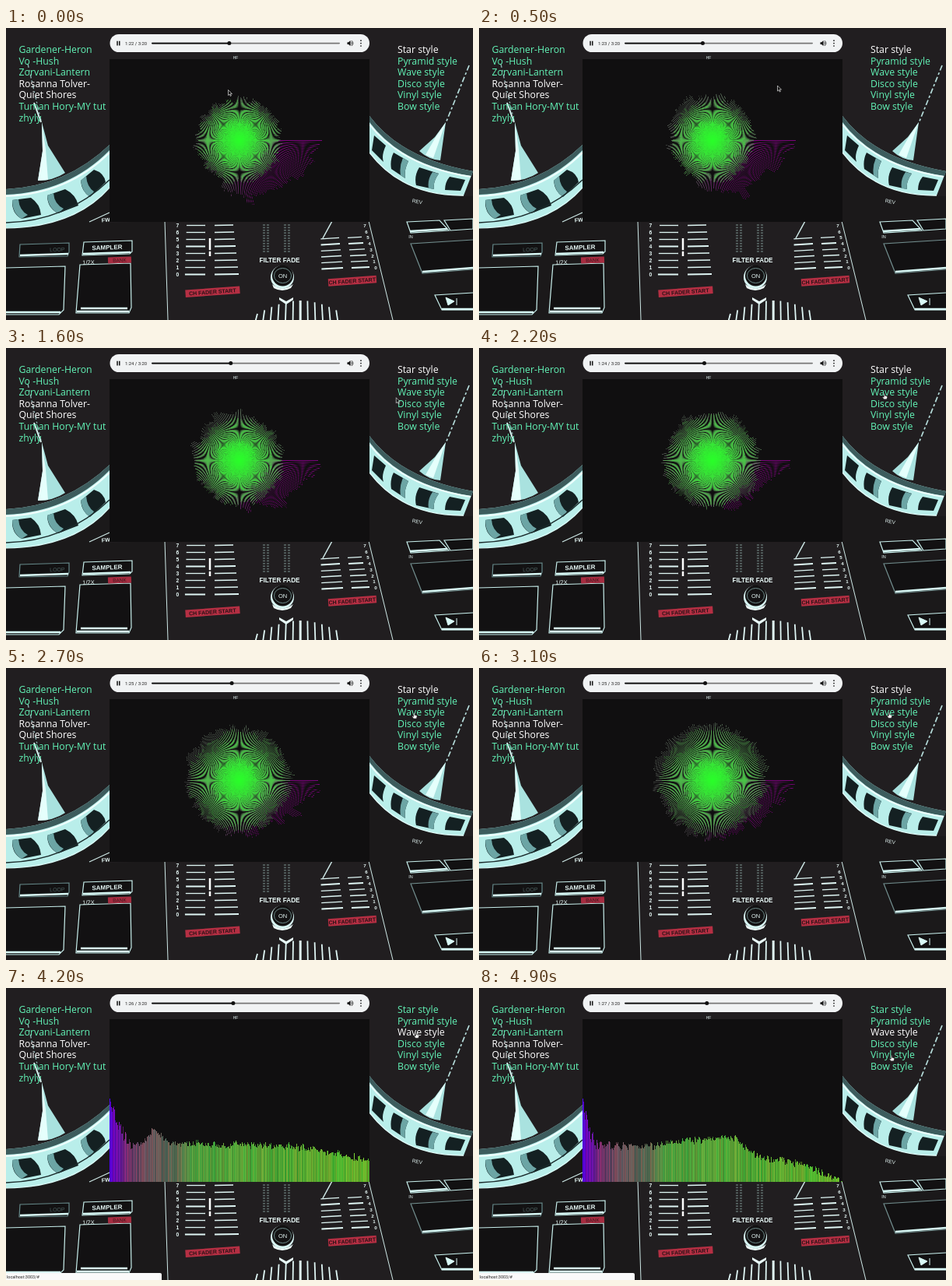
An HTML page with a canvas for the animation above (5000 ms loop, 600x375 px).

```html
<!DOCTYPE html>
<html lang="en">
<head>
<meta charset="utf-8">
<title>Music visualizer</title>
<style>
  html, body { margin: 0; width: 100%; height: 100%; overflow: hidden; background: #211e20; }
  svg, canvas { position: absolute; left: 0; top: 0; }
  #plot { left: 133px; top: 40px; }
  .menu { font: 12.3px "Open Sans", "Noto Sans", sans-serif; fill: #62f3b6; }
  .menu .on { fill: #fff; }
  .print { font-family: "Liberation Sans", Arial, sans-serif; fill: #e6f7f5; }
  .ui { font-family: Roboto, sans-serif; fill: #222; }
</style>
</head>
<body>
<svg width="600" height="375" viewBox="0 0 600 375">
  <rect width="600" height="375" fill="#211e20"/>
  <path d="M0 257Q80 258 133 203V250L204 248L208 375H0ZM467 161Q510 218 600 216V375H497L466 248Z" fill="#1b191a"/>

  <!-- left jog wheel -->
  <path d="M0 207Q78 203 133 150V205Q88 256 0 257Z" fill="#b9eeea"/>
  <path d="M0 207Q78 203 133 150V157Q80 211 0 214Z" fill="#3d5c5d"/>
  <path d="M0 216Q80 213 133 160" fill="none" stroke="#effffd" stroke-width="2"/>
  <path d="M8 221L32 218Q44 226 45 240L20 245Q7 238 8 221ZM53 215L76 207Q90 214 93 228L67 238Q53 231 53 215ZM96 196L113 182Q126 186 128 198L108 217Q97 210 96 196Z" fill="#142022"/>
  <path d="M8 221Q8 238 20 245L28 240Q17 234 16 220ZM53 215Q54 231 67 238L74 232Q62 226 61 212ZM96 196Q98 211 108 217L113 210Q104 204 103 190Z" fill="#6ca5a5"/>
  <path d="M0 250Q78 248 133 195" fill="none" stroke="#1a2a2b" stroke-width="1.5"/>
  <path d="M0 257Q88 256 133 205" fill="none" stroke="#d9fbf8" stroke-width="1.2"/>
  <path d="M46 121L54 151L76 186Q61 196 41 196L47 158Z" fill="#a9e2df"/>
  <path d="M46 121L51 156L54 195L41 196L47 158Z" fill="#e5fffc"/>
  <path d="M28 46L45 119" stroke="#8fb9b7" stroke-width="1.3" stroke-dasharray="5 3 2 4"/>
  <path d="M36 96L45 121" stroke="#d6f4f1" stroke-width="2"/>

  <!-- right jog wheel -->
  <path d="M467 113Q508 168 600 184L588 215Q510 216 467 160Z" fill="#b9eeea"/>
  <path d="M467 113Q508 168 600 184L598 190Q508 176 467 121Z" fill="#3d5c5d"/>
  <path d="M467 124Q510 178 597 191" fill="none" stroke="#effffd" stroke-width="2"/>
  <path d="M473 138L488 151Q482 164 485 172L470 157ZM498 160L517 171Q511 183 513 193L495 181Q493 170 498 160ZM531 179L556 187Q548 198 550 207L527 202Q524 190 531 179ZM570 191L590 195L584 209L564 208Q564 198 570 191Z" fill="#142022"/>
  <path d="M517 171Q511 183 513 193L507 189Q505 178 510 167ZM556 187Q548 198 550 207L543 206Q541 195 548 185Z" fill="#6ca5a5"/>
  <path d="M467 160Q510 216 588 215" fill="none" stroke="#e2fffc" stroke-width="1.3"/>
  <path d="M565 121L558 170Q543 169 531 158L551 140Z" fill="#a9e2df"/>
  <path d="M565 121L549 167L539 163L552 140Z" fill="#e5fffc"/>
  <path d="M595 48L565 122" stroke="#b5dcda" stroke-width="1.7" stroke-dasharray="7 3 3 3"/>

  <!-- panel edges -->
  <g fill="none" stroke="#cfe9e7">
    <path d="M204 248L208 375M466 248L497 375" stroke-width="1"/>
    <path d="M107 249L133 237" stroke-width="1.2"/>
    <path d="M419 248L407 270" stroke-width="1.5"/>
    <path d="M262 270V293" stroke="#fff" stroke-width="2.5"/>
    <path d="M260 286H264" stroke="#111" stroke-width="1.5"/>
  </g>

  <!-- pads -->
  <g fill="#121112" stroke="#c8efec" stroke-width="1.2">
    <path d="M18 278L81 276V288L79 293L17 294Z" stroke="#66898a"/>
    <path d="M100 275L162 273V287L159 290L98 292Z"/>
    <path d="M95 304L160 302L161 359L158 366H90Z"/>
    <path d="M0 308L76 306L74 362L68 368H0"/>
    <path d="M515 249L557 247L569 260L520 263Z"/>
    <path d="M563 247L600 245V258L571 260Z"/>
    <path d="M600 272L520 277L535 315L600 310" stroke="#718d8d"/>
    <path d="M600 340L551 343L560 362L600 362"/>
  </g>
  <g fill="none" stroke="#d9faf7" stroke-width="2.5">
    <path d="M18 292L80 290M99 290L160 288M91 364H158M96 360H156M0 365H70M519 261L567 258M535 313L600 308M560 361H600"/>
  </g>
  <path d="M565 346L576 351L568 356ZM579 347V356" fill="#d9faf7" stroke="#d9faf7"/>
  <rect x="131" y="294" width="30" height="8" fill="#a62c40" transform="rotate(-2 146 298)"/>

  <!-- filter button -->
  <circle cx="355" cy="320" r="15" fill="#d7f6f3"/>
  <circle cx="355.500" cy="318" r="13.500" fill="#131213"/>
  <ellipse cx="355.500" cy="318" rx="11" ry="9.500" fill="none" stroke="#6c8988"/>
  <path d="M342 329Q355 340 369 329L366 334Q355 340 344 334Z" fill="#f1fffe"/>
  <path d="M351 346L360 351L369 346V349L360 355L351 349Z" fill="#e9fbf9"/>

  <g id="marks" stroke="#dff6f4"></g>
  <g id="print" class="print"></g>
</svg>

<canvas id="plot" width="334" height="209"></canvas>

<svg width="600" height="375" viewBox="0 0 600 375">
  <rect x="133.500" y="8" width="333.500" height="23" rx="11.500" fill="#f1f3f4"/>
  <path d="M142.300 16.800h1.500v5.800h-1.500zM145 16.800h1.500v5.800H145z" fill="#111"/>
  <text id="clock" class="ui" x="153" y="21.700" font-size="5.900"></text>
  <rect x="187" y="18.800" width="242" height="1.600" rx=".8" fill="#777"/>
  <rect id="played" x="187" y="18.800" height="1.600" rx=".8" fill="#111"/>
  <circle id="knob" cy="19.600" r="2.500" fill="#111"/>
  <path d="M438.500 18.200h1.700l2.300-2.200v7.200l-2.300-2.200h-1.700z" fill="#111"/>
  <path d="M443.500 17.800q1.600 1.800 0 3.600M444 16.200q3.800 3.400 0 6.800" fill="none" stroke="#111" stroke-width=".8"/>
  <path d="M456 16.200v.01M456 19.600v.01M456 23v.01" stroke="#111" stroke-width="1.700" stroke-linecap="round"/>
  <g id="songs" class="menu"></g>
  <g id="styles" class="menu"></g>
  <g id="status">
    <path d="M0 366H198Q200 366 200 368V375H0Z" fill="#fafafa"/>
    <text class="ui" x="1" y="372.500" font-size="5.500">localhost:3003/#</text>
  </g>
  <path id="arrow" d="M0 0V7L1.700 5.500L2.800 8L3.900 7.500L2.800 5.100H5Z" fill="#111" stroke="#fff" stroke-width=".6"/>
  <path id="hand" d="M-.7 0Q0-.8.6 0V2.300L3 2.900Q3.700 3.200 3.500 4.300L2.800 6.800H-.8L-2.600 4.200Q-2.300 3.200-.7 4.300Z" fill="#fff" stroke="#222" stroke-width=".5"/>
</svg>

<script>
const LOOP = 5000, STEP = 100, SWITCH = 3400;
const BINS = 1024, TURNS = 4, SPOKES = BINS / TURNS;
const W = 334, H = 209, CX = 167, CY = 104.5;
const $ = id => document.getElementById(id);

function add(parent, tag, attrs, text) {
  const node = document.createElementNS("http://www.w3.org/2000/svg", tag);
  for (const key in attrs) node.setAttribute(key, attrs[key]);
  if (text !== undefined) node.textContent = text;
  parent.append(node);
  return node;
}

// Printed labels and scales on the mixer
function label(text, x, y, size, turn = 0, more = {}) {
  add($("print"), "text", {
    x, y, "font-size": size, "text-anchor": "middle",
    transform: `rotate(${turn} ${x} ${y})`, ...more
  }, text);
}
function line(x1, y1, x2, y2, width, stroke = "#dff6f4") {
  add($("marks"), "line", { x1, y1, x2, y2, "stroke-width": width, stroke });
}
function redTag(x, y, width) {
  add($("print"), "rect", {
    x: x - width / 2, y: y - 5, width, height: 9.5, fill: "#b52f43",
    transform: `rotate(-4 ${x} ${y})`
  });
  label("CH FADER START", x, y + 2.4, 7, -4, { fill: "#2a1216", "font-weight": 700 });
}

label("SAMPLER", 130, 284.5, 8, -2, { "font-weight": 700 });
label("LOOP", 66, 287, 7, -2, { fill: "#4c6262" });
label("1/2X", 106, 303.5, 7.5, -1);
label("BANK", 146, 300.5, 6.5, -2, { fill: "#3b141b" });
label("FW", 128.5, 249, 7, -5, { "font-weight": 700 });
label("FILTER FADE", 351.5, 300.5, 8.2, 0, { "font-weight": 700 });
label("ON", 355.5, 321, 7.5);
label("REV", 528, 225, 6.5, 10);
label("IN", 520, 270, 5.5);
label("HF", 295, 39.5, 5);
redTag(265.5, 339, 70);
redTag(445, 325, 62);

for (let i = 0; i < 8; i++) {
  const y = 253.5 + i * 9, bold = i === 3 || i === 7 ? 2 : 1.3;
  label(7 - i, 220.5, y + 2.5, 6.8, 0, { "font-weight": 700 });
  line(232 - i * .3, y, 256, y, bold);
  line(268, y, 292 + i, y - .5, bold);
  const ry = 254 + i * 7.7, shift = i * 2;
  label(7 - i, 461 + shift, ry + 2, 6.2, 0, { "font-weight": 700 });
  if (i > 1) {
    line(404 + i * .2, ry + 1.5, 426 + i, ry, bold);
    line(437 + i, ry, 453 + shift, ry - 1, bold);
  }
}
for (let y = 253; y < 288; y += 3.4)
  for (const x of [330, 335, 357, 362]) line(x, y, x + 3, y, 1.6, "#596766");
for (let i = 0; i < 12; i++) {
  const x = 323 + i * 9.2, big = i === 6;
  const y = 372 - 22 * Math.sin(Math.PI * (i + 1) / 14);
  line(x, y, x - (6 - i) * .4, 376, big ? 3 : 1.8);
}

// Side menus
function menu(group, rows, x) {
  return rows.map((row, i) => add(group, "text", { x, y: 32.2 + i * 14.55 }, row));
}
menu($("songs"), ["Gardener-Heron", "Vo -Hush", "Zorvani-Lantern", "Rosanna Tolver-",
  "Quiet Shores", "Tuman Hory-MY tut", "zhyly"], 16.5)
  .forEach((row, i) => row.classList.toggle("on", i === 3 || i === 4));
const styles = menu($("styles"), ["Star", "Pyramid", "Wave", "Disco", "Vinyl", "Bow"]
  .map(name => name + " style"), 503);

// Time, then bar heights at evenly spaced square roots of the frequency
const levels = [
  [0, 104, 105, 88, 80, 80, 50, 56, 54, 53, 52, 53, 51, 50, 48, 44, 38, 30, 20],
  [1000, 105, 106, 94, 88, 62, 50, 52, 68, 50, 52, 50, 49, 47, 45, 41, 36, 28, 18],
  [2200, 100, 99, 84, 66, 58, 58, 62, 63, 60, 60, 59, 58, 56, 53, 48, 42, 32, 20],
  [3100, 106, 106, 90, 78, 72, 70, 73, 75, 70, 68, 67, 66, 63, 58, 52, 45, 34, 20],
  [3800, 107, 104, 92, 72, 60, 50, 48, 52, 56, 55, 55, 53, 51, 48, 48, 44, 38, 30],
  [4200, 107, 104, 94, 76, 60, 46, 48, 68, 50, 48, 49, 48, 48, 47, 46, 43, 36, 27],
  [4900, 107, 98, 82, 58, 46, 47, 46, 46, 45, 46, 52, 54, 55, 57, 30, 27, 17, 0]
];
const pointer = [[0, 285.5, 79.5], [1000, 481.5, 68.5], [2200, 521, 59],
  [3100, 527, 57.5], [4200, 527, 57.5], [4900, 530, 87]];
const starStops = [[0, 150, 0, 150], [.05, 120, 0, 120], [.08, 100, 95, 100],
  [.2, 100, 125, 100], [.35, 85, 165, 80], [1, 60, 225, 60]];
const waveStops = [[0, 85, 0, 235], [.03, 115, 15, 180], [.07, 120, 50, 110],
  [.13, 115, 85, 100], [.26, 95, 115, 85], [.32, 85, 170, 65], [1, 100, 190, 45]];

const clamp = (v, lo, hi) => Math.min(hi, Math.max(lo, v));
const mix = (a, b, f) => a + (b - a) * f;
function rnd(a, b) {
  const s = Math.sin(a * 127.1 + b * 311.7) * 43758.5453;
  return s - Math.floor(s);
}
// Interpolates rows whose first entry is their position
function sample(rows, at, ease = f => f) {
  let i = 0;
  while (i < rows.length - 2 && at > rows[i + 1][0]) i++;
  const [a, b] = [rows[i], rows[i + 1]];
  const f = ease(clamp((at - a[0]) / (b[0] - a[0]), 0, 1));
  return a.slice(1).map((v, k) => mix(v, b[k + 1], f));
}
const ramp = stops => Array.from({ length: BINS }, (_, i) => sample(stops, i / BINS));
const starColors = ramp(starStops), waveColors = ramp(waveStops);

function spectrum(t) {
  const base = sample(levels, t), step = t / STEP, last = base.length - 1;
  return Float32Array.from({ length: BINS }, (_, i) => {
    const u = i / (BINS - 1), p = last * Math.sqrt(u), j = Math.min(last - 1, Math.floor(p));
    const rough = Math.min(1, i / 10) * (7 + 18 * Math.exp(-14 * u));
    const wobble = (rnd(Math.floor(i / 5), step) - .5) * rough + (rnd(i, step + 60) - .5) * 5;
    return clamp(mix(base[j], base[j + 1], p - j) + wobble, 0, 107);
  });
}

const ctx = $("plot").getContext("2d");
const image = ctx.createImageData(W, H), px = image.data;

function clear() {
  for (let i = 0; i < px.length; i += 4) {
    px[i] = px[i + 2] = 16;
    px[i + 1] = 15;
    px[i + 3] = 255;
  }
}
function drawStar(bars) {
  const core = [40, 255, 40];
  for (let y = 0; y < H; y++) for (let x = 0; x < W; x++) {
    const dx = x + .5 - CX, dy = y + .5 - CY, r = Math.hypot(dx, dy);
    if (r > 108) continue;
    const a = (Math.atan2(dy, dx) / (2 * Math.PI) + 1) % 1 * SPOKES;
    const spoke = Math.round(a);
    const gap = Math.abs(a - spoke) * r * 2 * Math.PI / SPOKES;
    const cover = .8 * Math.max(0, 1 - gap / .45);
    if (!cover) continue;
    const glow = Math.max(0, 1 - r / 38), at = (y * W + x) * 4;
    for (let turn = 0; turn < TURNS; turn++) {
      const bin = turn * SPOKES + spoke % SPOKES;
      if (r > bars[bin]) continue;
      for (let c = 0; c < 3; c++)
        px[at + c] = mix(px[at + c], mix(starColors[bin][c], core[c], glow), cover);
    }
  }
}
function drawWave(bars) {
  for (let x = 0; x < W; x++) {
    const bin = Math.floor(x / W * BINS), color = waveColors[bin];
    const shade = (x % 2 ? .78 : 1.06) + (rnd(x, 3) - .5) * .2;
    const tint = (rnd(x, 7) - .5) * 60;
    for (let y = Math.round(H - bars[bin]); y < H; y++) {
      const at = (y * W + x) * 4;
      px[at] = color[0] * shade + tint;
      px[at + 1] = color[1] * shade;
      px[at + 2] = color[2] * shade;
    }
  }
}

function render(t) {
  const wave = t >= SWITCH, bars = spectrum(t);
  clear();
  (wave ? drawWave : drawStar)(bars);
  ctx.putImageData(image, 0, 0);

  const time = 82.5 + t / 1000, x = 187 + 242 * time / 200;
  const sec = String(Math.floor(time % 60)).padStart(2, "0");
  $("clock").textContent = `${Math.floor(time / 60)}:${sec} / 3:20`;
  $("played").setAttribute("width", x - 187);
  $("knob").setAttribute("cx", x);

  styles.forEach((row, i) => row.classList.toggle("on", i === (wave ? 2 : 0)));
  $("status").style.display = wave ? "" : "none";

  const [mx, my] = sample(pointer, t, f => f * f * (3 - 2 * f));
  const over = mx > 503;
  for (const id of ["arrow", "hand"]) {
    $(id).setAttribute("transform", `translate(${mx} ${my})`);
    $(id).style.display = (id === "hand") === over ? "" : "none";
  }
}

const start = performance.now();
let shown = -1;
function tick() {
  const t = Math.floor((performance.now() - start) % LOOP / STEP) * STEP;
  if (t !== shown) render(shown = t);
  requestAnimationFrame(tick);
}
tick();
</script>
</body>
</html>
```
